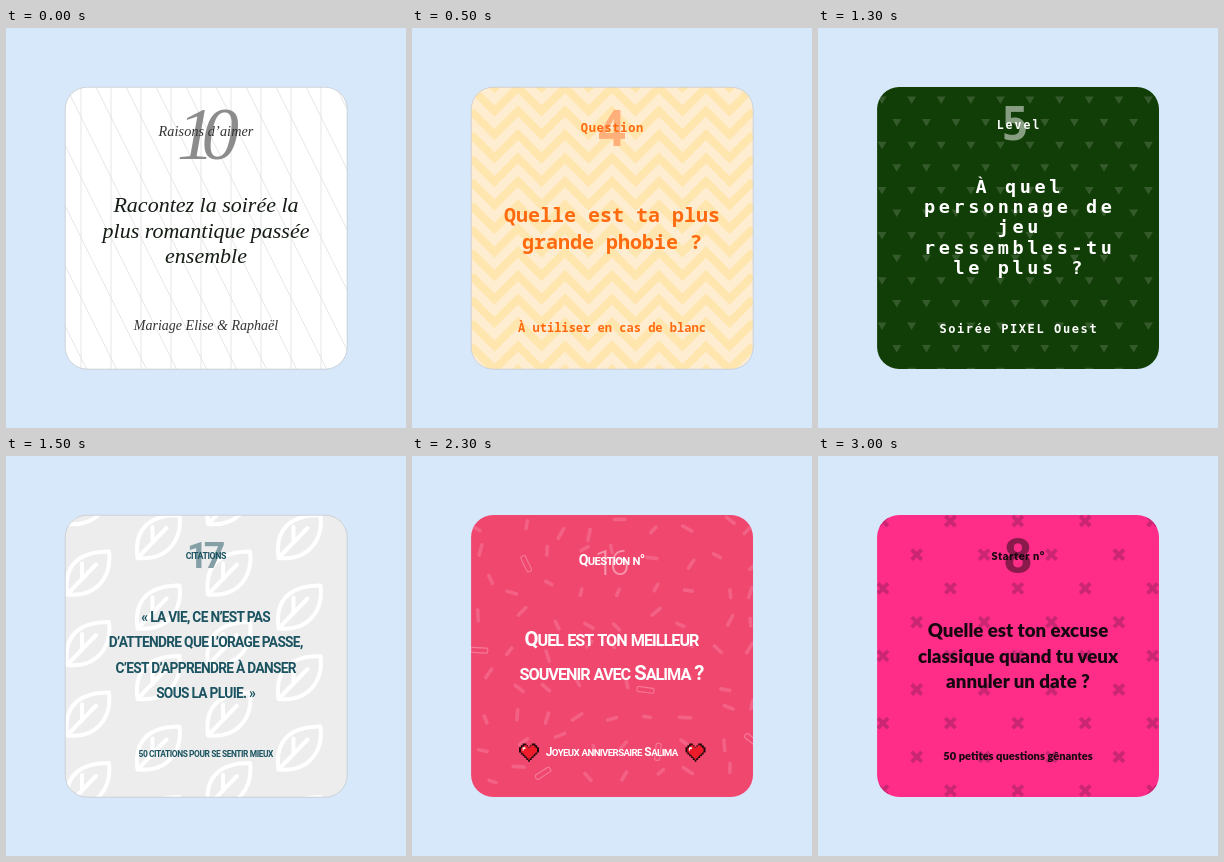
Recreate the animation shown at these times as an HTML page. Size 400 by 400 pixels, loop 3500 ms.

```html
<!DOCTYPE html>
<html lang="fr">
<head>
<meta charset="utf-8">
<title>Cartes</title>
<style>
  html, body { margin: 0; width: 100%; height: 100%; overflow: hidden; background: #d8e8fb; }
  svg { display: block; width: 100vw; height: 100vh; }
  text { text-anchor: middle; white-space: pre; }
  .script { font-family: "Liberation Serif", serif; font-style: italic; }
  .code { font-family: "Noto Sans Mono", "DejaVu Sans Mono", monospace; font-weight: 700; }
  .arcade { font-family: "DejaVu Sans Mono", monospace; font-weight: 700; }
  .slim { font-family: var(--slim), sans-serif; font-weight: 700; font-stretch: 62.5%; }
  .serif { font-family: "Liberation Serif", serif; font-weight: 700; }
  .round { font-family: Lato, sans-serif; font-weight: 900; }
</style>
</head>
<body>
<svg id="stage" viewBox="0 0 400 400">
  <defs><clipPath id="card"><rect x="59.1" y="59.1" width="281.9" height="281.9" rx="22"/></clipPath></defs>
</svg>
<script>
const HOLD = 500, LEFT = 59, SIZE = 282;
const stage = document.getElementById('stage');

// Width in em of a sample set in the condensed cut of a family.
function sampleWidth(family) {
  const probe = document.createElementNS(stage.namespaceURI, 'text');
  probe.setAttribute('class', 'slim');
  probe.style.cssText = `font-family: "${family}", sans-serif; font-size: 100px`;
  probe.textContent = 'ATTENDRE QUE ORAGE PASSE';
  stage.append(probe);
  const em = probe.getComputedTextLength() / 100;
  probe.remove();
  return em;
}

// Condensed lettering uses the narrowest family, set larger the narrower it is.
const TIGHT = .05, NORMAL = 13.46, LETTERS = 24;
const [slimFamily, slimWidth] = ['Noto Sans', 'Open Sans', 'Roboto']
  .map(f => [f, sampleWidth(f)])
  .reduce((a, b) => (b[1] < a[1] ? b : a));
const slimScale = (NORMAL - LETTERS * TIGHT) / (slimWidth - LETTERS * TIGHT);
stage.style.setProperty('--slim', `"${slimFamily}"`);

// One text line, centred on x: size, baseline, letter spacing.
const line = (str, size, y, gap = 0, x = 200, extra = '') =>
  `<text x="${x + gap / 2}" y="${y}" font-size="${size}" letter-spacing="${gap}" ${extra}>${str}</text>`;

const lines = (list, size, y, step, gap) =>
  list.map((str, i) => line(str, size, y + i * step, gap)).join('');

// Condensed line, placed by the middle of its capitals.
function slim(str, size, mid, tight = TIGHT, x = 200, extra = '') {
  const px = size * slimScale;
  return line(str, px, mid + px * .357, -tight * px, x, extra);
}

const smallCaps = str => str.replace(/[a-zà-ÿ]+/g,
  run => `<tspan font-size=".8em">${run.toUpperCase()}</tspan>`);

// Repeats a mark on a grid whose odd rows are shifted by half a step.
function brick(x0, y0, dx, dy, mark) {
  let out = '';
  for (let row = 0, y = y0; y < 375; row++, y += dy)
    for (let x = x0 + (row % 2) * dx / 2; x < 375; x += dx)
      out += `<g transform="translate(${x.toFixed(2)} ${y.toFixed(2)})">${mark}</g>`;
  return out;
}

function random(seed) {
  return () => (seed = (seed * 16807) % 2147483647) / 2147483647;
}

function slats() {
  let d = '';
  for (let x = 75; x < 342; x += 30) d += `M${x} 59V342`;
  for (let x = -90; x < 342; x += 30) d += `M${x} 59l141 283`;
  return `<path d="${d}" fill="none" stroke="#e0e0e0" stroke-width=".8"/>`;
}

function chevrons() {
  const half = SIZE / 12;
  let d = '';
  for (let y = 36; y < 370; y += half) {
    d += `M${LEFT} ${y}`;
    for (let i = 0; i < 12; i++) d += `l${half} ${i % 2 ? -half : half}`;
  }
  return `<path d="${d}" fill="none" stroke="#ffe6ae" stroke-width="8"/>`;
}

const triangles = () =>
  brick(64, 72, 29.6, 22.6, '<path d="M-4.5-3.5h9L0 4z" fill="#fff" opacity=".15"/>');

// Leaf columns alternate by half a row.
function leaves() {
  const leaf = '<path d="M-21 22C-25-8-8-21 21-21C24 4 9 25-21 22ZL8-8M-6-9V7" ' +
    'fill="none" stroke="#fff" stroke-width="4" stroke-linecap="round" stroke-linejoin="round"/>';
  let out = '';
  for (let c = 0; c < 4; c++)
    for (let y = c % 2 ? 80 : 46; y < 370; y += 70.5)
      out += `<g transform="translate(${82 + c * 70.5} ${y})">${leaf}</g>`;
  return out;
}

function sprinkles() {
  const rnd = random(73);
  let out = '';
  for (let y = 70; y < 345; y += 31)
    for (let x = 72; x < 345; x += 34) {
      const px = x + rnd() * 18 - 9, py = y + rnd() * 18 - 9, turn = rnd() * 180;
      const hollow = rnd() < .08, w = hollow ? 17 : 10 + rnd() * 5, h = hollow ? 5 : 3.6;
      out += `<rect x="${-w / 2}" y="${-h / 2}" width="${w}" height="${h}" rx="1.6" ` +
        `transform="translate(${px} ${py}) rotate(${turn})" ` +
        (hollow ? 'fill="none" stroke="#f67a98" stroke-width="1.1"/>' : 'fill="#f36285"/>');
    }
  return out;
}

function waves() {
  const ring = r => `<circle r="${r}" fill="#f4f5f9" stroke="#dce0ef" stroke-width="2.6"/>`;
  return brick(LEFT, 54, SIZE / 6, SIZE / 24, [22, 16.4, 10.8, 5.2].map(ring).join(''));
}

const crosses = () => brick(65, 65, 67.4, 33.7,
  '<path d="M-5-5L5 5M5-5L-5 5" stroke="#cb2673" stroke-width="4"/>');

function heart(x) {
  const shape = 'M2 0h2v1h1v1h1v-1h1v-1h2v1h1v1h1v3h-1v1h-1v1h-1v1h-1v1h-1v1h-1v-1h-1v-1h-1v-1h-1v-1h-1v-1h-1v-3h1v-1h1z';
  return `<g transform="translate(${x - 10} 287.5) scale(1.82)">
    <path d="${shape}" fill="#1c0a10"/>
    <path d="${shape}" fill="#ee1c2b" transform="translate(1.1 .9) scale(.8)"/>
    <path d="M2 2h1.5v1h-1v1h-.5z" fill="#fff"/></g>`;
}

const cards = [
  {
    face: 'script', fill: '#fff', ink: '#141c14', edge: true, pattern: slats,
    body: line('10', 75, 131, -13, 202, 'fill="#8c8c8c"') +
      line('Raisons d’aimer', 14.2, 108, .1, 200, 'fill="#333"') +
      lines(['Racontez la soirée la', 'plus romantique passée', 'ensemble'], 22, 184, 25.5) +
      line('Mariage Elise &amp; Raphaël', 14, 302, 0, 200, 'fill="#333"')
  },
  {
    face: 'code', fill: '#ffedd2', ink: '#ff6a0f', edge: true, pattern: chevrons,
    body: line('4', 50, 117.5, 0, 200, 'fill="#ffb07a"') +
      line('Question', 12, 104, .7) +
      lines(['Quelle est ta plus', 'grande phobie ?'], 20, 194, 26.5) +
      line('À utiliser en cas de blanc', 12.05, 303.5)
  },
  {
    face: 'arcade', fill: '#113d06', ink: '#fff', pattern: triangles,
    body: line('5', 46, 112, 0, 197, 'fill="#889e83"') +
      line('Level', 11.5, 100.5, 2) +
      lines(['À quel', 'personnage de', 'jeu', 'ressembles-tu', 'le plus ?'], 18.5, 165, 20.2, 3.6) +
      line('Soirée PIXEL Ouest', 12, 305, 1.6)
  },
  {
    face: 'slim', fill: '#ededed', ink: '#1b5360', edge: true, pattern: leaves,
    body: slim('17', 39, 99, .12, 200, 'fill="#84a0a6"') +
      slim('CITATIONS', 9.1, 100) +
      ['« LA VIE, CE N’EST PAS', 'D’ATTENDRE QUE L’ORAGE PASSE,', 'C’EST D’APPRENDRE À DANSER', 'SOUS LA PLUIE. »']
        .map((str, i) => slim(str, 14.2, 161 + i * 25.5)).join('') +
      slim('50 CITATIONS POUR SE SENTIR MIEUX', 8.7, 298.5)
  },
  {
    face: 'slim', fill: '#f0476f', ink: '#fff', pattern: sprinkles,
    body: slim('16', 37, 106, .12, 200, 'fill="#f793ab" font-weight="300"') +
      slim(smallCaps('Question n°'), 14.6, 104) +
      slim(smallCaps('Quel est ton meilleur'), 21, 183) +
      slim(smallCaps('souvenir avec Salima ?'), 21, 217) +
      slim(smallCaps('Joyeux anniversaire Salima'), 12.5, 296) +
      heart(117) + heart(283.5)
  },
  {
    face: 'serif', fill: '#f4f5f9', ink: '#0b2f4e', edge: true, pattern: waves,
    body: line('1', 37, 119, 0, 191, 'fill="#7f98a6"') +
      line('3', 50, 129.5, 0, 206.5, 'fill="#7f98a6"') +
      line('Enseignement', 12, 104, 1.05) +
      lines(['Quel est le plus grand', 'obstacle que tu aies', 'réussi à surmonter ?'], 21.2, 180, 27.2) +
      line('Rencontres Rivage paisible', 12.3, 304)
  },
  {
    face: 'round', fill: '#ff2c88', ink: '#160810', pattern: crosses,
    body: line('8', 48, 117, 0, 200, 'fill="#8b1a4c"') +
      line('Starter n°', 11, 103.5, .6) +
      lines(['Quelle est ton excuse', 'classique quand tu veux', 'annuler un date ?'], 18.7, 181, 25.6) +
      line('50 petites questions gênantes', 11.1, 304)
  }
];

stage.insertAdjacentHTML('beforeend', cards.map(c => `
  <g class="${c.face}" fill="${c.ink}" display="none">
    <g clip-path="url(#card)"><rect x="59" y="59" width="283" height="283" fill="${c.fill}"/>${c.pattern()}</g>
    ${c.edge ? '<rect x="59.2" y="59.2" width="282" height="282" rx="22" fill="none" stroke="#c9ced3" stroke-width=".9"/>' : ''}
    ${c.body}
  </g>`).join(''));

const groups = [...stage.querySelectorAll(':scope > g')];

function draw(ms) {
  const now = Math.floor(ms / HOLD) % groups.length;
  groups.forEach((g, i) => g.setAttribute('display', i === now ? 'inline' : 'none'));
}

function tick() {
  draw(performance.now());
  requestAnimationFrame(tick);
}
tick();
</script>
</body>
</html>
```
